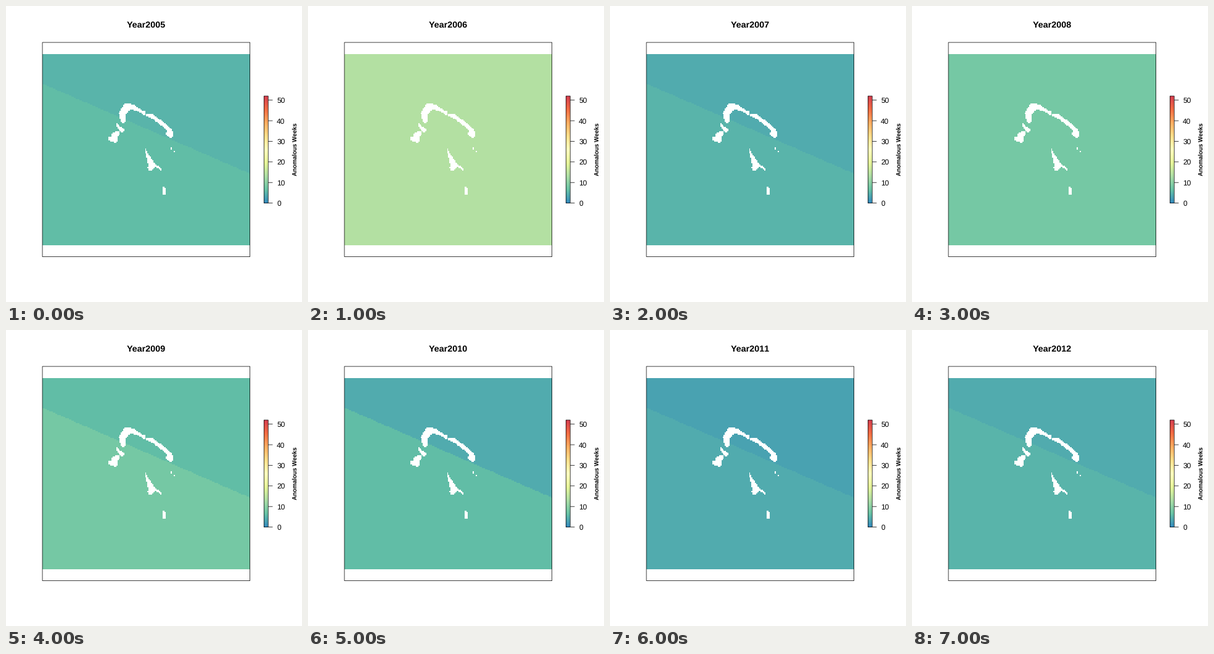
Recreate the animation shown at these times as a matplotlib script. Size 480 by 480 pixels, loop 8 s.

```python
import numpy as np
import matplotlib.pyplot as plt
from matplotlib.animation import FuncAnimation
from matplotlib.colors import LinearSegmentedColormap
from matplotlib.patches import Rectangle

SIZE, DPI = 480, 72          # at 72 dpi one point is one pixel
LINE = 0.75
MAX_WEEKS = 52
FIRST_YEAR = 2005
# anomalous weeks north and south of the dividing line, one pair per year
WEEKS = [(5, 6), (14, 14), (4, 5), (8, 8), (6, 8), (4, 6), (3, 4), (4, 5)]

LEFT, RIGHT, TOP, BOTTOM = 59, 396, 78, 388
COLS, ROWS = 180, 166

x = LEFT + (np.arange(COLS) + 0.5) * (RIGHT - LEFT) / COLS
y = TOP + (np.arange(ROWS) + 0.5) * (BOTTOM - TOP) / ROWS
gx, gy = np.meshgrid(x, y)
north = gy < 126 + 0.433 * (gx - LEFT)
land = np.zeros(gx.shape, bool)


def island(*points):
    """Brush land along (x, y, radius) points, blending between them."""
    knots = np.arange(len(points))
    steps = np.linspace(0, len(points) - 1, 20 * len(points))
    for px, py, r in zip(*(np.interp(steps, knots, v) for v in zip(*points))):
        land[np.hypot(gx - px, gy - py) < r] = True


# northern chain
island((190, 186.5, 3.2), (189, 174, 5.6), (196, 163.5, 6), (206, 164, 3.7),
       (215, 168.5, 3), (221, 172, 2.4))
island((223.8, 171, 1.2), (223.8, 177, 1.2))
island((230, 177, 2.2), (237, 178.5, 3.2), (248, 187, 3.2), (260, 195.5, 3),
       (267, 205, 3.8), (267, 210, 3.6), (260, 207, 1.7))
# western pair
island((179.5, 191.5, 1.4), (184, 198, 3.2), (188.5, 201.5, 3.2))
island((180.5, 206.5, 4), (176, 210, 5), (176.5, 217.5, 3.8), (169, 215.5, 3.4))
# southern islands and islets
island((226.5, 233.5, 1.6), (229.5, 242, 2), (234, 252, 4.2), (237, 258.5, 5.6),
       (234.5, 262.5, 4.3))
island((242, 258.5, 1.4), (248, 262, 1.6), (251, 265, 1.9))
island((256, 294, 2.1), (256.5, 302.5, 3.5))
island((267.5, 231, 1.2))
island((273.8, 235.5, 1.2))


def sea(year):
    upper, lower = WEEKS[year]
    return np.ma.array(np.where(north, upper, lower), mask=land)


spectral = LinearSegmentedColormap.from_list(
    "weeks", ["#3288BD", "#66C2A5", "#ABDDA4", "#E6F598", "#FFFFBF",
              "#FEE08B", "#FDAE61", "#F46D43", "#D53E4F"], N=1024)

plt.rcParams.update({"font.family": "Liberation Sans",
                     "text.hinting": "none",
                     "text.kerning_factor": 6})
fig = plt.figure(figsize=(SIZE / DPI, SIZE / DPI), dpi=DPI, facecolor="white")
ax = fig.add_axes([0, 0, 1, 1])
ax.axis("off")


def raster(data, box):
    return ax.imshow(data, cmap=spectral, vmin=0, vmax=MAX_WEEKS, extent=box,
                     aspect="auto", interpolation="nearest", zorder=1)


def outline(x0, y0, x1, y1):
    ax.add_patch(Rectangle((x0, y0), x1 - x0, y1 - y0, fill=False,
                           ec="black", lw=LINE, snap=False, zorder=2))


sea_map = raster(sea(0), (LEFT, RIGHT, BOTTOM, TOP))
outline(59.04, 59.04, 395.6, 406.56)

# colour key
KEY_L, KEY_R, KEY_T, KEY_B = 418.3, 425.2, 146, 319.6
raster(np.linspace(MAX_WEEKS, 0, 174)[:, None], (418, 425, 320, 146))
outline(KEY_L, KEY_T, KEY_R, KEY_B)
for tick in range(0, 51, 10):
    ty = KEY_B - tick * (KEY_B - KEY_T) / MAX_WEEKS
    ax.plot([KEY_R, KEY_R + 7.2], [ty, ty], color="black", lw=LINE,
            solid_capstyle="butt", snap=False, zorder=2)
    ax.text(439.2, ty + 4.4, str(tick), size=12, va="baseline")
ax.text(469.8, 232, "Anomalous Weeks", size=9.6, weight="bold",
        rotation=90, ha="center", va="center")

title = ax.text(227.6, 35, "", size=14.4, weight="bold", ha="center", va="baseline")
ax.set_xlim(0, SIZE)
ax.set_ylim(SIZE, 0)


def update(i):
    sea_map.set_data(sea(i))
    title.set_text(f"Year{FIRST_YEAR + i}")
    return sea_map, title


anim = FuncAnimation(fig, update, frames=len(WEEKS), interval=1000,
                     repeat=True, repeat_delay=0)
plt.show()
```
